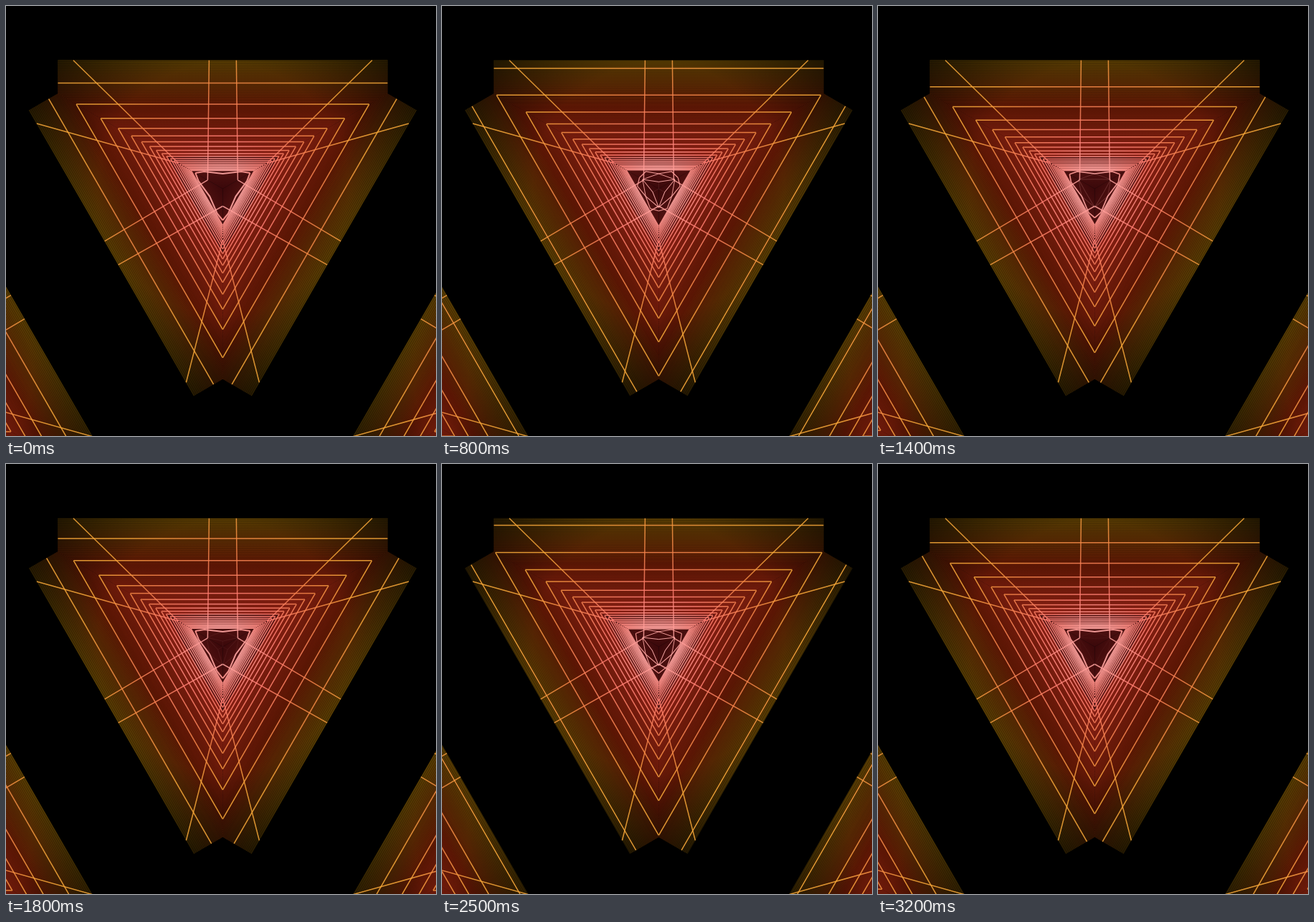
An HTML page with a canvas for the animation above (3.3 s loop, 600 by 600 pixels).

```html
<!DOCTYPE html>
<html lang="en">
<head>
<meta charset="utf-8">
<title>Triangle tunnel</title>
<style>
html, body { margin: 0; width: 100%; height: 100%; overflow: hidden; background: #000; }
canvas { display: block; width: 600px; height: 600px; }
</style>
</head>
<body>
<canvas id="stage" width="600" height="600"></canvas>
<script>
const ctx = document.getElementById('stage').getContext('2d');
const LOOP = 3300, STEP = 100, TAU = Math.PI * 2, ROOT3 = Math.sqrt(3);
const CX = 302.4, CY = 255;
const EDGE = 179.3;       // centre to outer edge of a wall
const HALF = 230;         // half length of a wall
const KNEE = HALF / ROOT3;
const DEPTH = 588;        // perspective: distance = DEPTH / index
const FINE = 20;          // faint lines per bright line
const LAST = 23.5;        // index of the innermost line
const MIRROR = 509.6;     // distance to the mirrored neighbours

function fade(g, stops) {
  for (const at in stops) g.addColorStop(+at, stops[at]);
  return g;
}
const across = stops => fade(ctx.createLinearGradient(0, 0, 0, -EDGE), stops);
const around = (r0, r1, stops) => fade(ctx.createRadialGradient(0, 0, r0, 0, 0, r1), stops);

const base = across({ 0: '#3a080a', 0.2: '#561412', 0.64: '#440f03', 1: '#463002' });
const faint = across({ 0: '#8c1c1c', 0.64: '#882406', 1: '#8a6204' });
const glow = around(0, 250, { 0: '#ffb8b8', 0.3: '#ff7c70', 0.55: '#f58448', 0.8: '#f8a838' });
const shade = around(175, 292, { 0: 'rgba(0,0,0,0)', 1: 'rgba(0,0,0,0.6)' });

function path(points) {
  ctx.beginPath();
  for (const [x, y] of points) ctx.lineTo(x, y);
}

function stroke(points, width, alpha) {
  ctx.lineWidth = width;
  ctx.globalAlpha = alpha;
  path(points);
  ctx.stroke();
  ctx.globalAlpha = 1;
}

function rungs(first, step, last, width, alpha) {
  for (let k = first; k < last; k += step) {
    const n = DEPTH / k, half = Math.min(n * ROOT3, HALF);
    stroke([[-half, -n], [half, -n]], width, alpha);
  }
}

function wall(phase) {
  path([[0, 0], [-HALF, -KNEE], [-HALF, -EDGE], [HALF, -EDGE], [HALF, -KNEE]]);
  ctx.fillStyle = base;
  ctx.fill();

  const near = DEPTH / EDGE;
  ctx.strokeStyle = faint;
  rungs(phase - Math.floor((phase - near) * FINE) / FINE, 1 / FINE, 13, 0.9, 0.42);

  path([[0, 0], [-HALF, -KNEE], [-HALF, -EDGE], [HALF, -EDGE], [HALF, -KNEE]]);
  ctx.fillStyle = shade;
  ctx.fill();

  ctx.strokeStyle = glow;
  rungs(phase, 1, LAST, 1.5, 0.88);
  for (const side of [-1, 1]) {
    stroke([[side * 19, -EDGE], [side * 21, -21 / ROOT3]], 1.5, 0.85);
    stroke([[side * 208.5, -EDGE], [side * 62, -62 / ROOT3]], 1.5, 0.85);
  }
}

// Pulsing ring with a three-pointed star that comes and goes inside it.
function heart(u) {
  const c = Math.cos(2 * TAU * u), s = Math.sin(2 * TAU * u);
  const mid = 21, shoulder = 22 + 4 * c;
  const corner = 39 + 5 * c - 3 * Math.sin(TAU * u);
  const dip = 10 - 4 * s, star = 0.45 * (1 - c);
  const tip = (r, side) => [side * r * ROOT3 / 2, -r / 2];

  ctx.strokeStyle = glow;
  stroke([tip(corner, -1), [-shoulder, -24], [0, -mid], [shoulder, -24], tip(corner, 1)],
    1.2 + 0.9 * Math.max(0, c), 0.9);
  for (const n of [dip, mid]) stroke([tip(26, -1), [0, -n], tip(26, 1)], 1, star);
  stroke([[0, 0], [0, -dip]], 1, star * Math.max(0, s));
}

function triangle(x, y, turn, part) {
  for (let i = 0; i < 3; i++) {
    ctx.save();
    ctx.translate(x, y);
    ctx.rotate(turn + i * TAU / 3);
    part();
    ctx.restore();
  }
}

function draw(u) {
  let phase = 3.985 - 2 * u;
  while (phase < DEPTH / EDGE) phase++;
  ctx.fillStyle = '#000';
  ctx.fillRect(0, 0, 600, 600);
  triangle(CX, CY, 0, () => wall(phase));
  triangle(CX, CY, 0, () => heart(u));
  for (const side of [-1, 1]) {
    triangle(CX + side * MIRROR * ROOT3 / 2, CY + MIRROR / 2, Math.PI, () => wall(phase));
  }
}

const start = performance.now();
function tick() {
  const time = (performance.now() - start) % LOOP;
  draw(Math.floor(time / STEP) * STEP / LOOP);
  requestAnimationFrame(tick);
}
tick();
</script>
</body>
</html>
```
